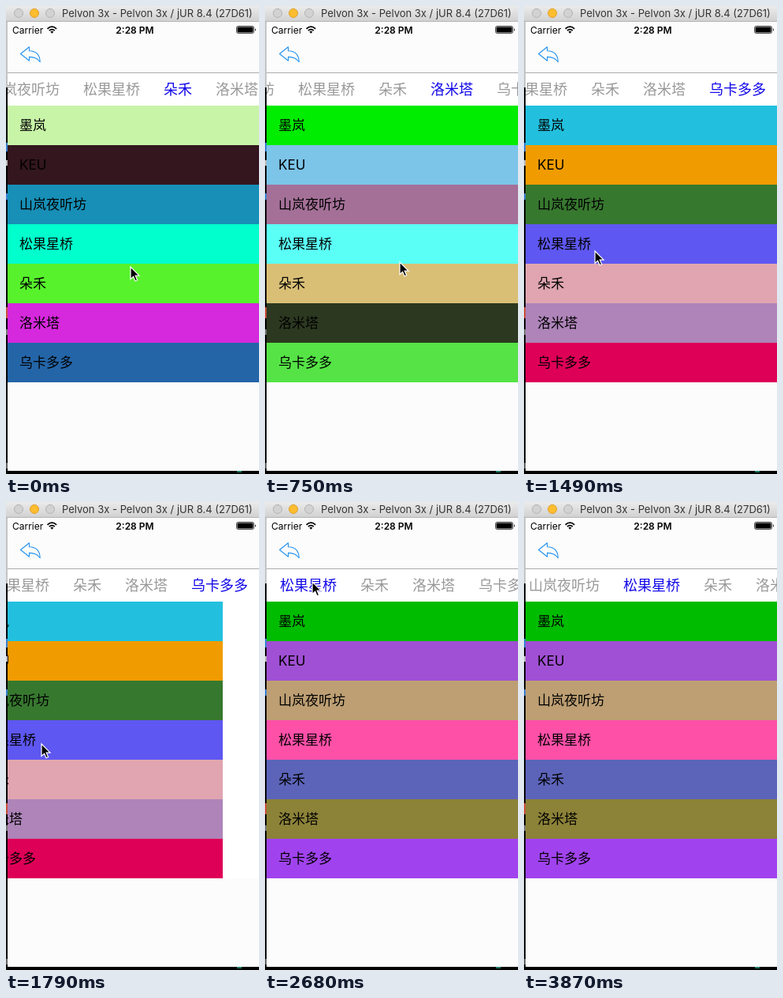
An HTML page for the animation above (4.14 s loop, 321 px wide and 592 px high).

```html
<!DOCTYPE html>
<html lang="zh">
<head>
<meta charset="utf-8">
<style>
  html, body { margin: 0; width: 100%; height: 100%; overflow: hidden; background: #000; }
  svg { display: block; width: 321px; height: 592px; }
  text { font-family: Inter, "Noto Sans CJK SC", "Noto Sans CJK", sans-serif; white-space: pre; }
  .tab { font-size: 18px; font-weight: 300; fill: #999; }
  .tab.on { fill: #1208e8; }
  .row { font-size: 17px; }
</style>
</head>
<body>
<svg viewBox="0 0 321 592">
  <defs>
    <linearGradient id="bar" x2="0" y2="1">
      <stop stop-color="#ebebeb"/><stop offset="1" stop-color="#d0d0d0"/>
    </linearGradient>
  </defs>
  <rect x="2" y="20" width="319" height="568" fill="#fcfcfc"/>
  <rect x="2" y="85" width="319" height="391" fill="#fff"/>
  <g id="pages"></g>
  <g id="tabs"></g>

  <!-- desktop showing around the window -->
  <rect y="20" width="2" height="83" fill="#c4c4c4"/>
  <rect y="103" width="2" height="489"/>
  <rect y="588" width="321" height="4"/>
  <g fill="#3c7fd0">
    <rect y="173" width="2" height="11"/><rect y="237" width="2" height="8"/>
  </g>
  <rect y="195" width="2" height="7" fill="#bbb"/>
  <rect y="381" width="2" height="14" fill="#c8503c"/>
  <rect y="409" width="2" height="7" fill="#777"/>
  <rect y="578" width="2" height="7" fill="#666"/>
  <rect x="293" y="588" width="6" height="2" fill="#1c7a66"/>

  <!-- window title -->
  <rect width="321" height="20" fill="url(#bar)"/>
  <rect y="19" width="321" height="1" fill="#b4b4b4"/>
  <g fill="#d2d2d2" stroke="#b4b4b4">
    <circle cx="16" cy="9" r="5.5"/>
    <circle cx="36" cy="9" r="5.5" fill="#fdbd2f" stroke="#e0a02a"/>
    <circle cx="56" cy="9" r="5.5"/>
  </g>
  <text x="71" y="14" font-size="13" fill="#333">Pelvon 3x - Pelvon 3x / jUR 8.4 (27D61)</text>

  <!-- status and navigation -->
  <text x="8" y="34.5" font-size="12">Carrier</text>
  <g fill="none" stroke="#000" stroke-width="1.8">
    <path d="M52.5 28.8Q58.3 23.4 64.1 28.8M54.8 31.2Q58.3 28 61.8 31.2"/>
    <path d="M58.3 34.8L56.3 32.6Q58.3 31 60.3 32.6Z" fill="#000" stroke="none"/>
  </g>
  <text x="163.5" y="34.5" font-size="12" font-weight="600" text-anchor="middle">2:28 PM</text>
  <rect x="292.5" y="25.5" width="22" height="9" rx="2" fill="none" stroke="#000" stroke-width=".7"/>
  <rect x="293.5" y="26.5" width="20" height="7" rx="1"/>
  <path d="M316 28.2Q318 30 316 31.8Z"/>
  <path d="M18.5 60.5L29.5 51.8V56.8C38.5 57 43 62.5 43.2 70.8C40 66 36 64.4 29.5 64.4V69.2Z"
        fill="none" stroke="#2492ee" stroke-width="1.1" stroke-linejoin="round"/>
  <rect x="2" y="84" width="319" height="1" fill="#acacac"/>

  <path id="cursor" d="M0 0V15.5L3.6 12.2L6 17.8L8.6 16.7L6.2 11.2H11Z"
        stroke="#fff" stroke-width="1.2"/>
</svg>
<script>
const $ = id => document.getElementById(id);
const names = ["墨岚", "KEU", "山岚夜听坊", "松果星桥", "朵禾", "洛米塔", "乌卡多多"];
const PAGE = 320, LOOP = 4140, BEAT = 148.85;
const palettes = {
  3: "00bc00 a050d4 bd9f73 ff50a8 5c64b9 8c8238 a043ee",
  4: "c8f4a8 33161e 178fb6 00ffcc 57f22c d628dd 2465a8",
  5: "00ec00 7cc4e8 a47098 5afff6 d9bf76 2c3820 55e346",
  6: "22c0de f09c00 37782f 5e57f1 e0a5b0 ae84b9 de0057"
};

const scrollKeys = [[0, 1280], [1, 1292], [2, 1355], [3, 1500], [4, 1586], [5, 1600], [6, 1600],
  [7, 1650], [8, 1794], [9, 1890], [10, 1920], [11, 1925], [12, 1967], [13, 1978], [14, 1935],
  [15, 1920], [17, 1920], [18, 960]];
const tabKeys = [[0, 200], [1, 148], [2, 144], [5, 144], [6, 120], [7, 87], [8, 85],
  [17, 85], [18, 121], [19, 218], [20, 228]];
const cursorKeys = [[0, 158, 330], [1, 118, 326], [2, 13, 317], [3, -60, 315], [4, 50, 320],
  [5, 171, 324], [6, 160, 324], [7, 40, 318], [8, -60, 314], [9, -40, 312], [10, 90, 310],
  [11, 140, 309], [12, 45, 306], [13, -30, 290], [14, 15, 200], [15, 50, 125], [16, 60, 101],
  [19, 60, 101], [20, 56, 75], [22, 110, 270], [25, 262, 578], [26, 290, 640]];

function track(keys, t) {
  const i = keys.findIndex(k => k[0] > t);
  if (i < 0) return keys[keys.length - 1].slice(1);
  const a = keys[i - 1], b = keys[i], p = (t - a[0]) / (b[0] - a[0]);
  return a.slice(1).map((v, j) => v + (b[j + 1] - v) * p);
}

function add(parent, tag, attrs, label = "") {
  const el = document.createElementNS("http://www.w3.org/2000/svg", tag);
  for (const key in attrs) el.setAttribute(key, attrs[key]);
  el.textContent = label;
  return parent.appendChild(el);
}

const move = (el, x, y = 0) => el.setAttribute("transform", `translate(${x} ${y})`);

for (const [n, colors] of Object.entries(palettes)) {
  colors.split(" ").forEach((color, i) => {
    const x = n * PAGE, y = 126 + i * 50;
    add($("pages"), "rect", { x, y, width: PAGE, height: 50, fill: "#" + color });
    add($("pages"), "text", { class: "row", x: x + 15, y: y + 31 }, names[i]);
  });
}

// Tab places are relative to the fifth tab.
const tabs = [];
let tabX = -222;
for (let i = 2; i < names.length; i++) {
  tabs[i] = add($("tabs"), "text", { x: tabX, y: 112 }, names[i]);
  tabX += names[i].length * 18 + 30;
}

function draw(now) {
  const beat = Math.min(26, Math.floor((now % LOOP + 5) / BEAT));
  const [scroll] = track(scrollKeys, beat);
  const current = Math.min(6, Math.round(scroll / PAGE));
  move($("pages"), 2 - scroll);
  move($("tabs"), track(tabKeys, beat)[0]);
  tabs.forEach((tab, i) => tab.setAttribute("class", i === current ? "tab on" : "tab"));
  move($("cursor"), ...track(cursorKeys, beat));
}

const start = performance.now();
function loop() {
  draw(performance.now() - start);
  requestAnimationFrame(loop);
}
loop();
</script>
</body>
</html>
```
